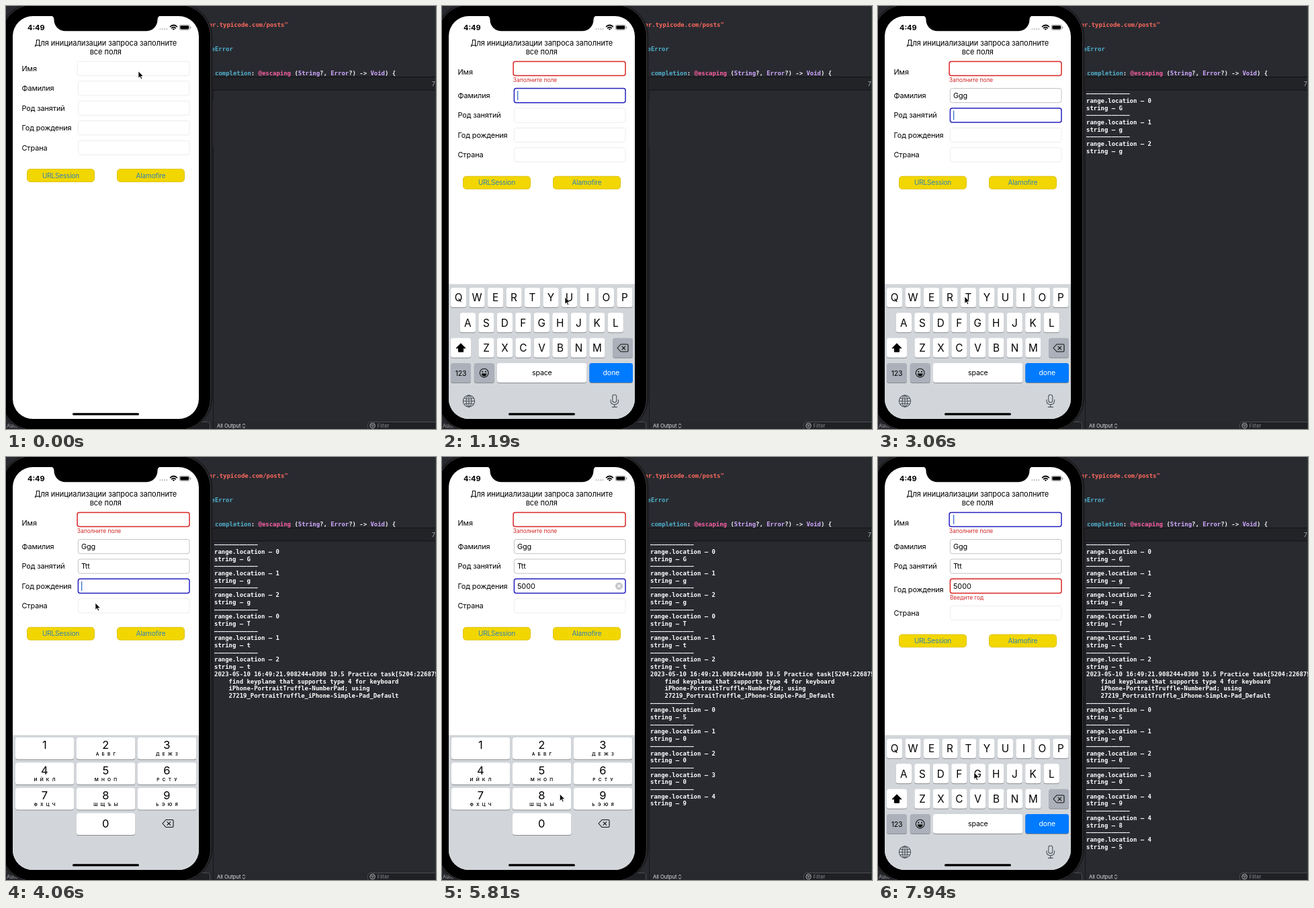
An HTML page that plays this animation: 640 px wide and 629 px high, repeating every 8000 ms.

```html
<!DOCTYPE html>
<html lang="ru">
<head>
<meta charset="utf-8">
<title>Form validation demo</title>
<style>
html, body { margin: 0; width: 100%; height: 100%; overflow: hidden; background: #292a30; }
svg { display: block; width: 100%; height: 100%; }
text { font-family: Inter, "Open Sans", sans-serif; white-space: pre; }
.mono text { font-family: "DejaVu Sans Mono", "Liberation Mono", monospace; font-weight: 700; font-size: 8.95px; fill: #fff; }
.form text { font-size: 10.9px; letter-spacing: -.1px; }
.form .title { font-size: 11.1px; letter-spacing: -.08px; text-anchor: middle; }
.form .err { font-size: 8.5px; letter-spacing: -.05px; fill: #d32a2a; }
.form .btn { font-size: 10px; letter-spacing: -.15px; fill: #2f83b5; text-anchor: middle; }
.key, .word, .digit, .sub { text-anchor: middle; }
.key { font-size: 15.3px; }
.word { font-size: 10.6px; letter-spacing: -.2px; }
.digit { font-size: 16.5px; }
.sub { font-size: 6.5px; font-weight: 600; letter-spacing: 4.2px; }
.line { fill: none; stroke-width: 1.1; stroke-linecap: round; stroke-linejoin: round; }
</style>
</head>
<body>
<svg id="stage" viewBox="0 0 640 629" preserveAspectRatio="none"></svg>
<script>
const LOOP = 8000;
const T_NAME = 310, T_SURNAME = 920, T_JOB = 2640, T_YEAR = 3800, T_BACK = 6900;

// time, range location, character, field that accepts it (-1: rejected)
const typed = [
  [1540, 0, 'G', 1], [1790, 1, 'g', 1], [2020, 2, 'g', 1],
  [3120, 0, 'T', 2], [3280, 1, 't', 2], [3440, 2, 't', 2],
  [4540, 0, '5', 3], [4820, 1, '0', 3], [4980, 2, '0', 3], [5110, 3, '0', 3],
  [5500, 4, '9', -1], [6010, 4, '8', -1], [6230, 4, '5', -1]
];
const focus = [[T_NAME, 0], [T_SURNAME, 1], [T_JOB, 2], [T_YEAR, 3], [T_BACK, 0]];
const path = [
  [0, 197, 97], [520, 197, 97], [840, 190, 127], [980, 190, 127], [1190, 183, 433],
  [1420, 147, 468], [2140, 147, 468], [2520, 140, 160], [2700, 140, 160], [3060, 129, 432],
  [3490, 129, 432], [3740, 133, 187], [3860, 133, 187], [4060, 133, 217], [4380, 149, 464],
  [4600, 149, 465], [4770, 164, 543], [5180, 164, 543], [5430, 239, 502], [5600, 239, 502],
  [5920, 152, 501], [6080, 152, 501], [6200, 152, 465], [6310, 152, 465], [6560, 176, 108],
  [6780, 186, 91], [7050, 186, 91], [7700, 145, 464], [7940, 143, 469]
];

const label = (x, cy, s, cls = '', size = 10.9, extra = '') =>
  `<text x="${x}" y="${cy + size * .36}" class="${cls}" ${extra}>${s}</text>`;
const box = (x, y, w, h, r, fill, extra = '') =>
  `<rect x="${x}" y="${y}" width="${w}" height="${h}" rx="${r}" fill="${fill}" ${extra}/>`;
const cap = (x, y, w, h, fill = '#fff', id = '') =>
  box(x, y + 1, w, h, 3.5, '#898b8f') + box(x, y, w, h, 3.5, fill, id && `id="${id}"`);
const line = (d, color = '#111', extra = '') => `<path class="line" d="${d}" stroke="${color}" ${extra}/>`;
const erase = (x, y) =>
  line(`M${x - 8} ${y}l5 -5.5h9.5q1.5 0 1.5 1.5v8q0 1.5 -1.5 1.5h-9.5zM${x - 1} ${y - 2.4}l4.8 4.8m0 -4.8l-4.8 4.8`);

function desktop() {
  const code = (x, y, parts) => `<text x="${x}" y="${y + 3.2}">` +
    parts.map(([s, c]) => `<tspan fill="${c}">${s}</tspan>`).join('') + '</text>';
  const white = '#f2f2f4', type = '#d0a8ff';
  return box(0, 0, 640, 629, 0, '#292a30') + '<g class="mono">' +
    code(301.5, 28, [['er.typicode.com/posts"', '#fc6a5d']]) +
    code(305.5, 64, [['eError', '#4fb0cb']]) +
    code(311, 100, [['completion', '#4fb0cb'], [': ', white], ['@escaping', '#fc5fa3'], [' (', white],
      ['String', type], ['?, ', white], ['Error', type], ['?) -&gt; ', white], ['Void', type], [') {', white]]) +
    '</g>' + box(300, 105.5, 340, 19.5, 0, '#222327') + box(300, 105, 340, 1, 0, '#111215') +
    box(300, 124.5, 340, 1, 0, '#141518') +
    label(634, 116, '7', '', 8.5, 'font-size="8.5" fill="#b9b9bd"') +
    box(0, 617.5, 640, 12, 0, '#27282d') +
    label(314, 624.3, 'All Output', '', 7.6, 'font-size="7.6" fill="#e4e4e6"') +
    line('M352.3 623l1.7 -2l1.7 2M352.3 625.5l1.7 2l1.7 -2', '#d5d5d8', 'style="stroke-width:.9"') +
    box(538.5, 618.5, 110, 12, 4, '#1f2024', 'stroke="#4d4e53"') +
    '<circle cx="545.5" cy="624" r="3.8" fill="none" stroke="#c4c4c8" stroke-width=".9"/>' +
    line('M543.5 623h4M544.5 625h2', '#c4c4c8', 'style="stroke-width:.9"') +
    label(552.5, 624.3, 'Filter', '', 7.6, 'font-size="7.6" fill="#85868b"') +
    box(200, 618.5, 103.5, 12, 3, '#1f2024', 'stroke="#4d4e53"') +
    label(1, 624.3, 'Auto', '', 7.6, 'font-size="7.6" fill="#a5a5a9"') +
    box(308, 125, 1, 504, 0, '#17181b') + box(639, 0, 1, 629, 0, '#34443b');
}

function log() {
  const lines = [];
  typed.forEach(([t, loc, ch], i) => {
    if (i === 6) {
      lines.push([T_YEAR, '2023-05-10 16:49:21.908244+0300 19.5 Practice task[5204:226875]'],
        [T_YEAR, '    find keyplane that supports type 4 for keyboard'],
        [T_YEAR, '    iPhone-PortraitTruffle-NumberPad; using'],
        [T_YEAR, '    27219_PortraitTruffle_iPhone-Simple-Pad_Default']);
    }
    lines.push([t, '–'.repeat(12)], [t, `range.location – ${loc}`], [t, `string – ${ch}`]);
  });
  return '<g class="mono">' + lines.map(([t, s], i) =>
    `<text class="log" data-t="${t}" x="310" y="${(133.2 + i * 10.7).toFixed(1)}" xml:space="preserve">${s}</text>`).join('') + '</g>';
}

function letters() {
  const rows = [['QWERTYUIOP', 24.6, 419], ['ASDFGHJKL', 38.4, 456.3], ['ZXCVBNM', 66, 493.8]];
  const mod = '#abb0ba', ink = '#4d5259';
  return '<g id="letters">' + rows.map(([s, x0, y]) => [...s].map((c, i) => {
    const x = x0 + i * 27.48;
    return cap(x - 11.6, y, 23.2, 29) + label(x, y + 14.7, c, 'key', 15.3);
  }).join('')).join('') +
    cap(13, 493.8, 30, 29, '#fff', 'shift') +
    '<path id="arrow" d="M28 501.8l7 7h-3.4v5.4h-7.2v-5.4h-3.4z" stroke="#000" stroke-linejoin="round"/>' +
    cap(254, 493.8, 30, 29, mod) + erase(269, 508.5) +
    cap(13, 531, 30, 29, mod) + label(28, 546, '123', 'word', 10.6) +
    cap(47.8, 531, 30, 29, mod) +
    '<circle cx="62.7" cy="545.7" r="6.4" class="line" stroke="#111"/>' +
    '<circle cx="60.4" cy="543.8" r="1"/><circle cx="65" cy="543.8" r="1"/>' +
    '<path d="M58.7 546.5h8q-.6 4 -4 4t-4 -4z"/>' +
    cap(82, 531, 133.3, 29) + label(148.8, 545, 'space', 'word', 10.6) +
    cap(219.3, 531, 64.7, 29, '#007aff') + label(251.7, 545, 'done', 'word', 10.6, 'fill="#fff"') +
    '<circle cx="40" cy="587.5" r="8.6" class="line" stroke="' + ink + '"/>' +
    '<ellipse cx="40" cy="587.5" rx="4" ry="8.6" class="line" stroke="' + ink + '"/>' +
    line('M31.4 587.5h17.2M40 579v17M33 583q7 2.6 14 0M33 592q7 -2.6 14 0', ink) +
    box(253.8, 578, 6, 11.5, 3, 'none', `stroke="${ink}" stroke-width="1.1"`) +
    line('M251 585.5v1.5q0 5.6 5.8 5.6t5.8 -5.6v-1.5M256.8 592.6v3.6M253.3 596.4h7', ink) + '</g>';
}

function digits() {
  const subs = ['', 'АБВГ', 'ДЕЖЗ', 'ИЙКЛ', 'МНОП', 'РСТУ', 'ФХЦЧ', 'ШЩЪЫ', 'ЬЭЮЯ'];
  const keys = subs.map((s, i) => {
    const x = 14 + i % 3 * 91, y = 417 + Math.floor(i / 3) * 37.5;
    return cap(x, y, 87.2, 32.6, '#fff', 'd' + (i + 1)) + label(x + 43.3, y + 11.4, i + 1, 'digit', 16.5) +
      label(x + 45.6, y + 24.8, s, 'sub', 6.5);
  });
  return '<g id="digits">' + keys.join('') + cap(105, 529.5, 87.2, 32.6, '#fff', 'd0') +
    label(148.3, 545.3, '0', 'digit', 16.5) + erase(241, 545) + '</g>';
}

function form() {
  const names = ['Имя', 'Фамилия', 'Род занятий', 'Год рождения', 'Страна'];
  const rows = names.map((s, i) => {
    const x = i ? 107.4 : 106.1, y = 93 + i * 29.4;
    return `<g class="row">${label(23.5, y, s, 'name')}` +
      box(x, y - 10.6, 273 - x, 21.2, 3, '#fff', 'class="field"') + label(112, y, '', 'value') +
      label(x - .3, y + 17, i === 3 ? 'Введите год' : 'Заполните поле', 'err', 8.5) + '</g>';
  });
  const button = (x, s) => box(x, 242.6, 100, 18.8, 4.5, '#f2d600', 'stroke="#dfc30c"') +
    label(x + 50, 252, s, 'btn', 10);
  return '<g class="form">' + label(148.3, 54.6, 'Для инициализации запроса заполните', 'title', 11.1) +
    label(148.3, 68.2, 'все поля', 'title', 11.1) + rows.join('') +
    `<g id="buttons">${button(31.5, 'URLSession')}${button(165.5, 'Alamofire')}</g></g>` +
    '<g id="clear"><circle r="5.5" fill="#c5c5c8"/><path class="line" d="M-2 -2l4 4m0 -4l-4 4" stroke="#fff"/></g>' +
    '<rect id="caret" width="1.3" height="14" fill="#3a6fd0"/>';
}

function phone() {
  return box(303, 140, 5, 70, 1.5, '#17181a', 'stroke="#45464a" stroke-width=".8"') +
    box(-10, -4, 317.5, 636, 50, '#1b1b1e') +
    box(-7, -2, 311.5, 632.5, 47, '#000', 'stroke="#3b3b3e" stroke-width="1"') +
    '<clipPath id="screen"><rect x="10" y="15" width="277" height="599" rx="30"/></clipPath>' +
    '<g clip-path="url(#screen)">' + box(10, 15, 277, 599, 0, '#fff') + form() +
    '<g id="keyboard">' + box(10, 413.5, 277, 201, 0, '#d2d6da') + letters() + digits() + '</g>' +
    box(99, 605.3, 99, 3.3, 1.6, '#000') +
    '<path d="M66 14Q71.5 15 71.5 20.5A16.8 16.8 0 0 0 88.3 37.3H208.7A16.8 16.8 0 0 0 225.5 20.5Q225.5 15 231 14Z"/></g>' +
    label(32, 32, '4:49', '', 11, 'font-size="11" font-weight="700"') +
    [229.5, 232.8, 236.1, 239.4].map(x => `<circle cx="${x}" cy="34.3" r="1" fill="#b5b5b8"/>`).join('') +
    line('M244.6 30.6q4.9 -4.2 9.8 0M246.6 32.8q2.9 -2.4 5.8 0', '#000', 'style="stroke-width:1.7"') +
    '<path d="M247.7 34.2q1.8 -1.3 3.6 0l-1.8 1.9z"/>' +
    box(258.2, 28.2, 15, 7.3, 2.2, '#fff', 'stroke="#8a8a8a" stroke-width=".8"') +
    box(259.3, 29.3, 12.8, 5.1, 1.3, '#000') + box(274.2, 30.4, 1.1, 3, .5, '#8a8a8a');
}

const stage = document.getElementById('stage');
stage.innerHTML = desktop() + log() + phone() +
  '<path id="mouse" d="M0 0V10.2L2.4 8L4 11.7L5.7 11L4.1 7.4H7.3Z" fill="#000" stroke="#fff" stroke-width=".7"/>';

const $ = id => document.getElementById(id);
const all = q => [...stage.querySelectorAll(q)];
const show = (el, on) => el.setAttribute('visibility', on ? 'inherit' : 'hidden');
const move = (el, x, y) => el.setAttribute('transform', `translate(${x.toFixed(2)} ${y.toFixed(2)})`);
const logs = all('.log'), keys = all('.key');
const rows = all('.row').map(g => ({
  g, name: g.querySelector('.name'), field: g.querySelector('.field'),
  value: g.querySelector('.value'), err: g.querySelector('.err')
}));

function mouseAt(t) {
  const n = path.findIndex(p => p[0] > t);
  if (n < 0) return path[path.length - 1].slice(1);
  const [a, b] = [path[n - 1], path[n]];
  const u = (t - a[0]) / (b[0] - a[0]), e = u * u * (3 - 2 * u);
  return [a[1] + (b[1] - a[1]) * e, a[2] + (b[2] - a[2]) * e];
}

function draw(t) {
  logs.forEach(el => show(el, t >= +el.dataset.t));

  const [since, active] = focus.filter(f => f[0] <= t).pop() || [0, -1];
  const hits = typed.filter(k => k[0] <= t && k[3] >= 0);
  const values = rows.map((_, i) => hits.filter(k => k[3] === i).map(k => k[2]).join(''));
  const errors = rows.map((_, i) => (i === 0 && t >= T_SURNAME) || (i === 3 && t >= T_BACK));

  let dy = 0, caretY = 0;
  rows.forEach((r, i) => {
    move(r.g, 0, dy);
    if (i === active) caretY = 93 + i * 29.4 + dy;
    move(r.name, 0, errors[i] ? 5.4 : 0);
    show(r.err, errors[i]);
    if (r.value.textContent !== values[i]) r.value.textContent = values[i];
    const color = i === active ? '#2420be' : errors[i] ? '#da2424' : values[i] ? '#c2c2c4' : '#ececee';
    r.field.setAttribute('stroke', color);
    r.field.setAttribute('stroke-width', i === active || errors[i] ? 1.5 : 1);
    if (errors[i]) dy += 10.7;
  });
  move($('buttons'), 0, dy);

  const text = active < 0 ? '' : values[active];
  const last = Math.max(since, ...hits.map(k => k[0]));
  show($('caret'), active >= 0 && (t - last) % 1000 < 600);
  move($('caret'), text ? 112.2 + rows[active].value.getComputedTextLength() : 112, caretY - 7);
  show($('clear'), text !== '');
  move($('clear'), 263.5, caretY);

  const rise = Math.min(1, Math.max(0, (t - T_NAME) / 380));
  move($('keyboard'), 0, 202 * Math.pow(1 - rise, 3));
  const numeric = active === 3, upper = text === '';
  show($('digits'), numeric);
  show($('letters'), !numeric);
  keys.forEach(k => {
    const c = k.textContent;
    k.textContent = upper ? c.toUpperCase() : c.toLowerCase();
  });
  $('shift').setAttribute('fill', upper ? '#fff' : '#abb0ba');
  $('arrow').setAttribute('fill', upper ? '#000' : 'none');
  for (let d = 0; d < 10; d++) {
    const down = numeric && typed.some(k => k[2] === String(d) && t >= k[0] - 20 && t < k[0] + 90);
    $('d' + d).setAttribute('fill', down ? '#b5c0cc' : '#fff');
  }
  move($('mouse'), ...mouseAt(t));
}

const start = performance.now();
function tick() {
  draw((performance.now() - start) % LOOP);
  requestAnimationFrame(tick);
}
tick();
</script>
</body>
</html>
```
